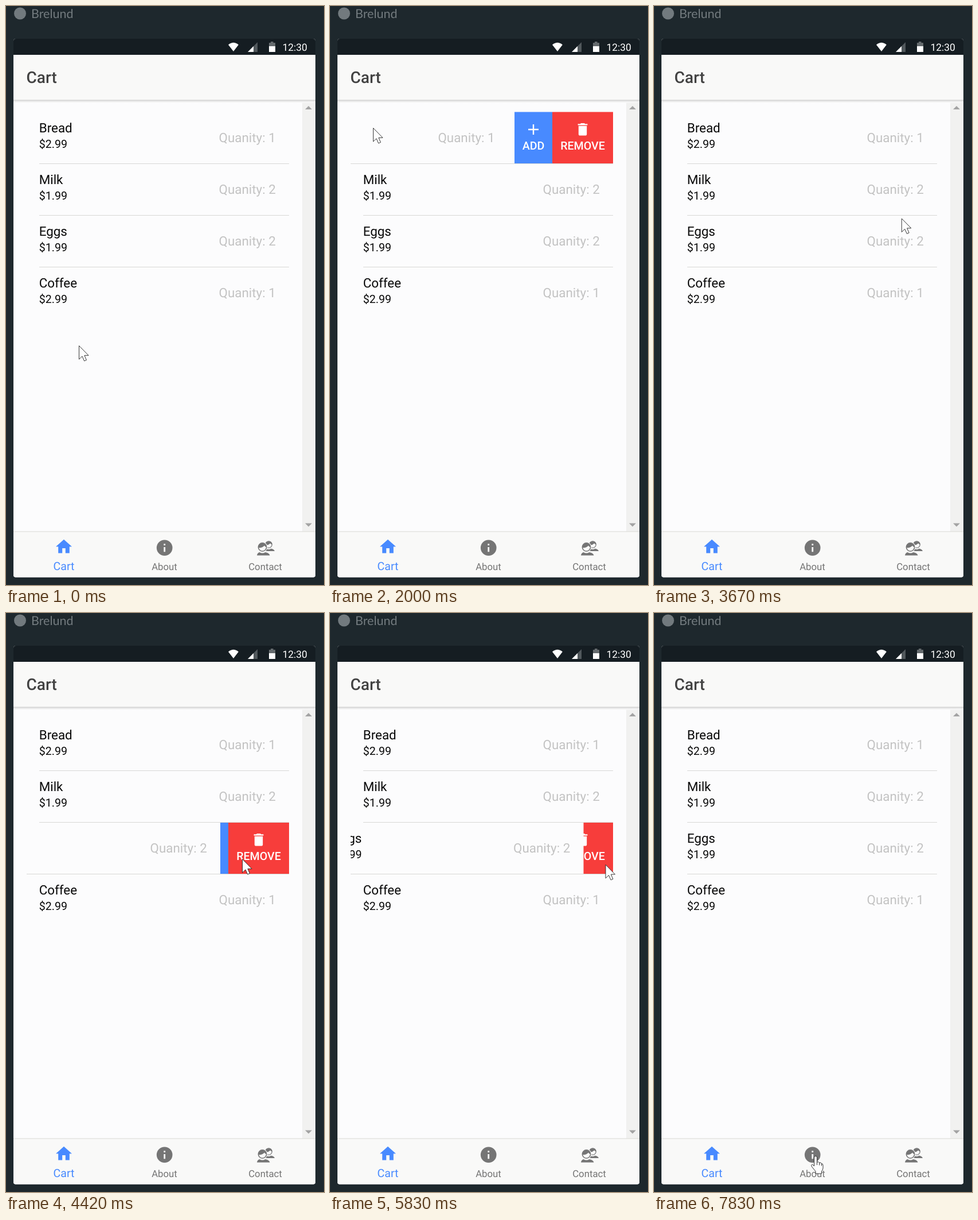
These frames come from a looping animation (555 by 1008 pixels, 8 s). An HTML page:

```html
<!DOCTYPE html>
<html lang="en">
<head>
<meta charset="utf-8">
<title>Cart</title>
<style>
html, body { margin: 0; width: 100%; height: 100%; overflow: hidden; background: #1e282d; }
svg { display: block; width: 555px; height: 1008px; font-family: Roboto, sans-serif; text-rendering: geometricPrecision; }
.name { font-size: 22.4px; fill: #080808; }
.price { font-size: 19.6px; fill: #080808; }
.qty { font-size: 22.4px; fill: #c3c3c3; }
.action { font-size: 19.6px; font-weight: 500; fill: #fff; text-anchor: middle; }
.tab { font-size: 16.8px; fill: #757575; text-anchor: middle; }
.tab.on { font-size: 19.6px; fill: #488aff; }
.pointer { fill: #fff; stroke: #222; stroke-width: .9; stroke-linejoin: round; }
</style>
</head>
<body>
<svg viewBox="0 0 555 1008">
  <defs>
    <clipPath id="list"><rect x="36" y="184" width="458" height="362"/></clipPath>
    <linearGradient id="shade" x2="0" y2="1">
      <stop stop-color="#c9c9c9"/>
      <stop offset=".4" stop-color="#e6e6e6"/>
      <stop offset="1" stop-color="#fcfcfd"/>
    </linearGradient>
    <g id="person">
      <path d="M-9.500 14.500q.5-4.500 4.500-5.500 5 3 10 0 7 1 8 5.500Z" fill="#757575"/>
      <circle r="9" fill="#f9f9f8"/>
      <circle r="7.200" fill="none" stroke="#757575" stroke-width="1.500"/>
      <path d="M-7.500 1q7 1 11-3.500 1.500 2.500 4 2.500A7.500 7.500 0 1 0-7.500 1Z" fill="#757575"/>
    </g>
  </defs>

  <rect width="555" height="1008" fill="#1e282d"/>
  <circle cx="24.500" cy="13" r="10.500" fill="#727a7e"/>
  <text x="44" y="21" font-family="Lato, sans-serif" font-size="21.500" fill="#727a7e">Brelund</text>

  <rect x="13" y="57" width="527" height="937.500" rx="4" fill="#fcfcfd"/>
  <path d="M13 85V61q0-4 4-4H536q4 0 4 4V85Z" fill="#151d22"/>
  <g fill="#fff">
    <path d="M388 67.500Q397 60 405.800 67.500L397 79Z"/>
    <path d="M422 80L439 63V80Z" fill="#51585c"/>
    <path d="M422 80L432 70V80Z"/>
    <path d="M459 64h3v-2h4.500v2h3.500v8h-11Z" fill="#656b6e"/>
    <rect x="459" y="70" width="11" height="10"/>
    <text x="482.500" y="78" font-size="17.400">12:30</text>
  </g>

  <rect x="13" y="85" width="527" height="79" fill="#f9f9f8"/>
  <text x="35.500" y="134" font-size="28" font-weight="500" fill="#424242">Cart</text>
  <rect x="517" y="165" width="23" height="750" fill="#f1f1f0"/>
  <rect x="13" y="163.500" width="527" height="5" fill="url(#shade)"/>
  <path d="M522 180l6-6 6 6ZM522 900.500l6 6 6-6Z" fill="#a3a3a3"/>

  <g clip-path="url(#list)">
    <g id="rows"></g>
    <g id="lines" fill="#d8d8d6"></g>
  </g>

  <path d="M13 915H540V990.500q0 4-4 4H17q-4 0-4-4Z" fill="#f9f9f8"/>
  <rect x="13" y="914.500" width="527" height="1" fill="#d9d9d6"/>
  <path transform="translate(84.200 924.500) scale(1.400)" fill="#488aff" d="M10 20v-6h4v6h5v-8h3L12 3 2 12h3v8z"/>
  <circle cx="276.700" cy="943.300" r="13.800" fill="#757575"/>
  <path d="M275.300 936.300h2.800v2.800h-2.800ZM275.300 941.900h2.800v8.400h-2.800Z" fill="#f9f9f8"/>
  <use href="#person" transform="translate(458.500 937.500) scale(.8)"/>
  <use href="#person" transform="translate(447.500 942)"/>
  <text class="tab on" x="101" y="982">Cart</text>
  <text class="tab" x="276.500" y="982">About</text>
  <text class="tab" x="452.500" y="982">Contact</text>

  <path id="arrow" class="pointer" d="M.5.500V24L6 18.800 9.600 27 13.400 25.400 9.900 17.300H17Z"/>
  <path id="hand" class="pointer" d="M-2.500 16V2a2.500 2.500 0 0 1 5 0V10q3-1.500 4 1 3-1 4 1.500 2.500 0 2.500 3.500V20q0 3-2.500 6v4H0v-4L-6.500 18q-2-3 .5-4 1.500 0 3.500 3ZM2.500 10v5M6.500 11v4.500M10.500 12.500v4"/>
</svg>
<script>
const LOOP = 8000, RATE = 12 / 1000, LAG = 20;
const ROW = 90, TOP = 184, LEFT = 58, RIGHT = 494, OPEN = 172;
const items = [['Bread', '$2.99', 1], ['Milk', '$1.99', 2], ['Eggs', '$1.99', 2], ['Coffee', '$2.99', 1]];

// Where the pointer is headed, and the screen tick it gets there
const stops = [
  { at: 4, x: 127, y: 591 },
  { at: 13, x: 393, y: 235 },
  { at: 24, x: 75, y: 212 },
  { at: 33, x: 282, y: 203 },
  { at: 38, x: 448, y: 238 },
  { at: 42, x: 424, y: 334 },
  { at: 50, x: 455, y: 476 },
  { at: 53, x: 412, y: 428 },
  { at: 55, x: 412, y: 428 },
  { at: 63, x: 120, y: 422 },
  { at: 71, x: 532, y: 440 },
  { at: 80, x: 457, y: 724 },
  { at: 83, x: 330, y: 828 },
  { at: 86, x: 98, y: 945 },
  { at: 90, x: 512, y: 950 },
  { at: 94, x: 282, y: 946 }
];
const drags = [
  { row: 0, from: 13, to: 38, grab: 294.5 },
  { row: 2, from: 50, to: 71, grab: 532 }
];

const clamp = (v, lo, hi) => Math.min(hi, Math.max(lo, v));
const mix = (a, b, u) => a + (b - a) * u;
const byId = id => document.getElementById(id);

function rowMarkup([name, price, qty], i) {
  return `<g transform="translate(0 ${TOP + ROW * i})">
    <g class="options">
      <rect x="322" y=".5" width="66" height="89.500" fill="#488aff"/>
      <rect x="388" y=".5" width="106" height="89.500" fill="#f73d3b"/>
      <path d="M346 31h18M355 22v18" stroke="#fff" stroke-width="2.400"/>
      <path transform="translate(426.600 16.400) scale(1.200)" fill="#fff"
        d="M6 19c0 1.100.9 2 2 2h8c1.100 0 2-.9 2-2V7H6zM19 4h-3.500l-1-1h-5l-1 1H5v2h14z"/>
      <text class="action" x="355" y="66">ADD</text>
      <text class="action" x="441" y="66">REMOVE</text>
    </g>
    <g class="item">
      <rect x="36" width="458" height="90" fill="#fcfcfd"/>
      <text class="name" x="57.700" y="36">${name}</text>
      <text class="price" x="57.700" y="63">${price}</text>
      <text class="qty" x="371.500" y="53">Quanity: ${qty}</text>
    </g>
  </g>`;
}

byId('rows').innerHTML = items.map(rowMarkup).join('');
byId('lines').innerHTML = items.slice(1).map((_, i) => `<rect y="${TOP + ROW * (i + 1)}" height="1"/>`).join('');
const movers = document.querySelectorAll('.item');
const options = document.querySelectorAll('.options');
const lines = byId('lines').children;

function pointerAt(tick) {
  const next = stops.find(s => s.at > tick) ?? stops.at(-1);
  const prev = stops.findLast(s => s.at <= tick) ?? stops[0];
  const u = (tick - prev.at) / (next.at - prev.at || 1);
  return next === prev ? prev : { x: mix(prev.x, next.x, u), y: mix(prev.y, next.y, u) };
}

// Dragged distance, with resistance once the row is fully open
const pull = d => d < OPEN ? Math.max(d, 0) : mix(OPEN, d, .233);

function shiftOf(row, tick, x) {
  const drag = drags.find(d => d.row === row && tick >= d.from && tick < d.to);
  if (!drag) return 0;
  const grip = clamp((tick - drag.from) / 3, 0, 1);
  const d = drag.grab - x;
  return (d < OPEN ? Math.max(d, 0) : OPEN + (d - OPEN) * .233) * grip;
}

function draw(time) {
  const tick = Math.floor((time % LOOP + LAG) * RATE);
  const { x, y } = pointerAt(tick);
  items.forEach((_, i) => {
    const d = shiftOf(i, tick, x);
    movers[i].setAttribute('transform', `translate(${-d} 0)`);
    options[i].style.display = d ? '' : 'none';
    lines[i]?.setAttribute('x', LEFT - d);
    lines[i]?.setAttribute('width', RIGHT - LEFT + d);
  });
  const shown = y > 915 ? 'hand' : 'arrow';
  for (const id of ['arrow', 'hand']) {
    byId(id).setAttribute('transform', `translate(${x} ${y})`);
    byId(id).style.display = id === shown ? '' : 'none';
  }
}

const start = performance.now();
function loop() {
  draw(performance.now() - start);
  requestAnimationFrame(loop);
}
loop();
</script>
</body>
</html>
```
